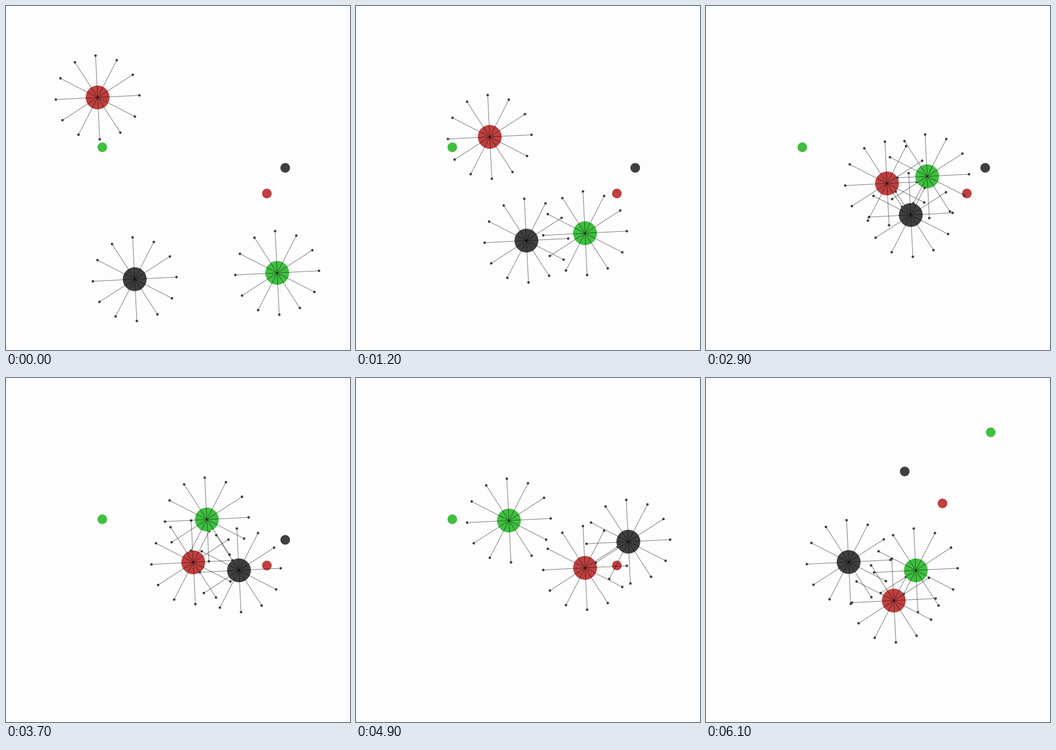
Write a matplotlib script that moves like this. It is 600x600 px and loops after 6200 ms.

```python
import numpy as np
import matplotlib.pyplot as plt
from matplotlib.animation import FuncAnimation
from matplotlib.collections import LineCollection, PolyCollection

SIZE, DPI = 600, 100
FRAMES, INTERVAL = 62, 100
BODY_R, GOAL_R, TIP_R, REACH = 20.8, 8.4, 2.2, 73.0
RED, GREEN, BLACK = "#bf4040", "#40bf40", "#403e40"
COLORS = (RED, GREEN, BLACK)

RAY_ANGLES = 0.05 + np.arange(12) * np.pi / 6
RAYS = np.column_stack([np.cos(RAY_ANGLES), -np.sin(RAY_ANGLES)])
ROUND = np.arange(30) * 2 * np.pi / 30
UNIT = np.column_stack([np.cos(ROUND), np.sin(ROUND)])

# Waypoints of the three agents (red, green, black) during the first episode.
TIMES = np.array([0, 3, 7, 12, 14, 21, 28, 35, 37, 42, 44, 49, 54, 56, 60])
PATHS = np.array([
    [[159.8, 171.1, 197.8, 233.3, 247.3, 299, 314.7, 319.5, 326.6, 357.3,
      369.3, 399.5, 427.7, 437.5, 449.5],
     [159.5, 170.5, 196.5, 228.3, 241.5, 281, 307, 319, 321.5, 327.5,
      329.3, 331.2, 330.3, 329.8, 328.8]],
    [[473, 461.7, 435, 399.5, 387, 368.7, 387, 361.5, 350.3, 317.3,
      302.4, 266.7, 231, 217.7, 192.7],
     [465.5, 454.5, 428.3, 396.3, 383, 336, 303, 257.5, 246.8, 240.2,
      243, 248.6, 248.5, 248.4, 248]],
    [[224.5, 235.7, 261.7, 297.2, 308, 320.3, 352, 392, 406.3, 439,
      451, 475, 493, 495.5, 497.3],
     [476.5, 466, 441.5, 409.2, 396.5, 369.3, 366.5, 344.5, 335.5, 310.5,
      301, 285.5, 277, 276.6, 278]],
])
SLOPES = np.gradient(PATHS, TIMES, axis=2)
SLOPES[:, :, 0] = 0  # everyone starts at rest

GOALS = np.array([[455, 327], [168, 246.4], [487, 282.3]])
NEXT_AGENTS = np.array([[327.6, 388.2], [366, 335.5], [248.8, 321]])
NEXT_GOALS = np.array([[412.5, 218.7], [496.6, 94.7], [346.6, 163]])


def agents_at(t):
    """Cubic Hermite interpolation of the waypoints."""
    i = min(np.searchsorted(TIMES, t, side="right") - 1, len(TIMES) - 2)
    h = TIMES[i + 1] - TIMES[i]
    s = (t - TIMES[i]) / h
    return ((1 + 2 * s) * (1 - s) ** 2 * PATHS[:, :, i]
            + s * (1 - s) ** 2 * h * SLOPES[:, :, i]
            + s * s * (3 - 2 * s) * PATHS[:, :, i + 1]
            + s * s * (s - 1) * h * SLOPES[:, :, i + 1])


def ray_length(origin, ray, others):
    """Distance along a ray to the nearest other body, limited to REACH."""
    best = REACH
    for center in others:
        gap = center - origin
        along = gap @ ray
        off2 = gap @ gap - along ** 2
        if along > 0 and off2 < BODY_R ** 2:
            best = min(best, along - np.sqrt(BODY_R ** 2 - off2))
    return best


def disc(center, radius):
    return center + radius * UNIT


fig = plt.figure(figsize=(SIZE / DPI, SIZE / DPI), dpi=DPI, facecolor="#fefdfe")
ax = fig.add_axes([0, 0, 1, 1])
ax.set_xlim(0, SIZE)
ax.set_ylim(SIZE, 0)
ax.axis("off")


def add_discs(color, z):
    return ax.add_collection(
        PolyCollection([], facecolors=color, edgecolors="none", zorder=z),
        autolim=False)


goal_art = [add_discs(c, 1) for c in COLORS]
agent_art = []
for n, color in enumerate(COLORS):
    z = 2 + 3 * n
    body = add_discs(color, z)
    lines = ax.add_collection(
        LineCollection([], colors=[(0, 0, 0, 0.5)], linewidths=0.72, zorder=z + 1),
        autolim=False)
    agent_art.append((body, lines, add_discs(BLACK, z + 2)))


def draw(frame):
    if frame < FRAMES - 1:
        agents, goals = agents_at(frame), GOALS
    else:
        agents, goals = NEXT_AGENTS, NEXT_GOALS
    for art, goal in zip(goal_art, goals):
        art.set_verts([disc(goal, GOAL_R)])
    for n, (body, lines, tips) in enumerate(agent_art):
        pos = agents[n]
        others = np.delete(agents, n, axis=0)
        ends = [pos + ray * ray_length(pos, ray, others) for ray in RAYS]
        body.set_verts([disc(pos, BODY_R)])
        lines.set_segments([[pos, end] for end in ends])
        tips.set_verts([disc(end, TIP_R) for end in ends])
    return []


anim = FuncAnimation(fig, draw, frames=FRAMES, interval=INTERVAL,
                     repeat=True, repeat_delay=0, blit=False)
plt.show()
```
